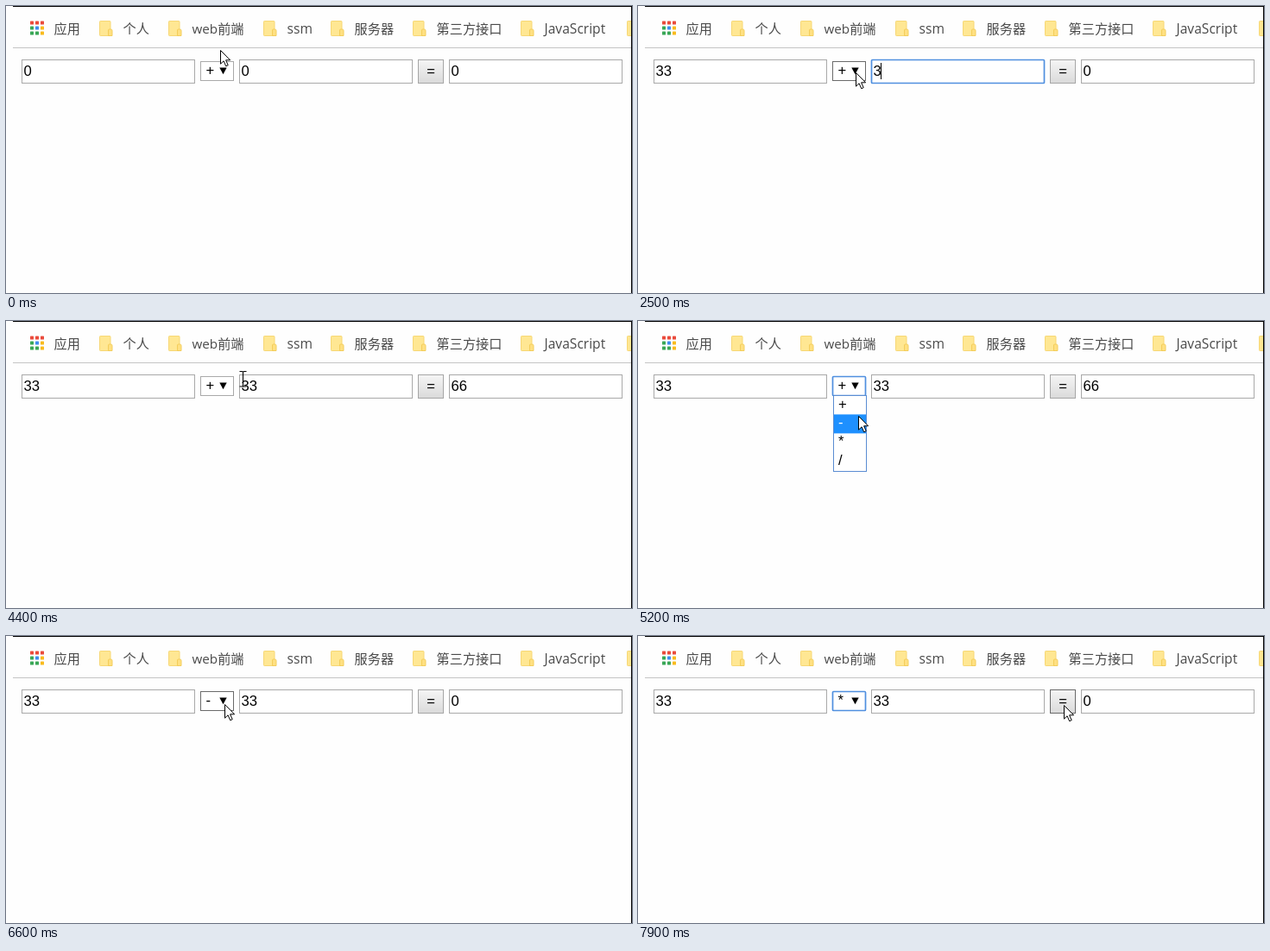
Animation of 725 by 333 pixels, one loop 8 s. Source, as an HTML page:

```html
<!DOCTYPE html>
<html lang="zh">
<head>
<meta charset="utf-8">
<title>Calculator</title>
<style>
html, body { margin: 0; width: 100%; height: 100%; overflow: hidden; background: #fefefe; }
svg { display: block; width: 725px; height: 333px; }
text { font: 16.67px "Liberation Sans", Arial, sans-serif; fill: #000; white-space: pre; }
.bar text { font: 15.2px "Open Sans", "Noto Sans CJK SC", "Noto Sans CJK", sans-serif; fill: #4a4a4a; }
.bar text.latin { font-size: 15.6px; }
</style>
</head>
<body>
<svg id="stage" viewBox="0 0 725 333" xmlns="http://www.w3.org/2000/svg">
  <defs>
    <linearGradient id="up" x1="0" y1="0" x2="0" y2="1">
      <stop offset="0" stop-color="#f5f5f5"/><stop offset="1" stop-color="#dadada"/>
    </linearGradient>
    <linearGradient id="down" x1="0" y1="0" x2="0" y2="1">
      <stop offset="0" stop-color="#dcdcdc"/><stop offset="1" stop-color="#eeeeee"/>
    </linearGradient>
  </defs>
  <rect width="725" height="333" fill="#fefefe"/>
</svg>
<script>
const NS = 'http://www.w3.org/2000/svg';
const LOOP = 8000, STEP = 100, DIGIT = 9.27;
const stage = document.getElementById('stage');

function add(parent, tag, attrs, text) {
  const el = document.createElementNS(NS, tag);
  set(el, attrs);
  if (text !== undefined) el.textContent = text;
  return parent.appendChild(el);
}
function set(el, attrs) {
  for (const k in attrs) el.setAttribute(k, attrs[k]);
}
function show(el, on) {
  el.setAttribute('visibility', on ? 'visible' : 'hidden');
}
const between = (t, a, b) => t >= a && t < b;

// Bookmark bar
const bar = add(stage, 'g', { class: 'bar' });
const [red, green, blue, yellow] = ['#ea4b3c', '#3aa757', '#3f8cf0', '#f9bb1e'];
[red, red, red, green, blue, yellow, green, green, yellow].forEach((fill, i) =>
  add(bar, 'rect', { x: 28 + i % 3 * 6, y: 17.5 + Math.floor(i / 3) * 6, width: 4, height: 4, rx: 0.6, fill }));
add(bar, 'text', { x: 55.5, y: 32 }, '应用');

function folder(x) {
  const g = add(bar, 'g', { transform: `translate(${x} 17)` });
  add(g, 'rect', { x: 0.5, y: 0.5, width: 12.5, height: 17, rx: 0.8, fill: '#ffe793', stroke: '#f7d774' });
  add(g, 'path', { d: 'M10.5 17.5V11q0-1 1-1h2q1.5 0 1.5 1.5v6z', fill: '#ffe082', stroke: '#f2cb55', 'stroke-width': 0.9 });
}
[[108, '个人'], [188, 'web前端'], [298, 'ssm'], [376, '服务器'], [471, '第三方接口'], [596, 'JavaScript']]
  .forEach(([x, label]) => {
    folder(x);
    add(bar, 'text', { x: x + 27.5, y: 32, class: /^\w+$/.test(label) ? 'latin' : '' }, label);
  });
folder(719);
add(stage, 'rect', { x: 8, y: 48, width: 716, height: 1, fill: '#c4c4c4' });
add(stage, 'rect', { x: 8, y: 0, width: 717, height: 1, fill: '#000' });
add(stage, 'rect', { x: 724, y: 0, width: 1, height: 333, fill: '#000' });

// Form controls
function field(x) {
  const box = add(stage, 'rect', { x: x + 0.5, y: 62.5, width: 200, height: 27, fill: '#fff' });
  const mark = add(stage, 'rect', { x: x + 2.5, y: 66, width: DIGIT, height: 19, fill: '#3390ff' });
  const text = add(stage, 'text', { x: x + 2.5, y: 81 });
  const caret = add(stage, 'rect', { y: 66, width: 1, height: 19 });
  return (value, focus, selected) => {
    border(box, focus, '#a9a9a9');
    show(mark, selected);
    text.textContent = value;
    text.style.fill = selected ? '#fff' : '#000';
    caret.setAttribute('x', Math.round(x + 2.5 + DIGIT * value.length - 0.5));
    show(caret, focus && !selected);
  };
}
function border(el, focus, plain) {
  set(el, focus ? { stroke: '#4f8fdf', 'stroke-width': 1.7, rx: 1 } : { stroke: plain, 'stroke-width': 1, rx: 0 });
}
const first = field(18), second = field(270), result = field(513);

const select = add(stage, 'rect', { x: 225.5, y: 64.5, width: 38, height: 22, fill: '#fff' });
const chosen = add(stage, 'text', { x: 231.5, y: 80 });
add(stage, 'path', { d: 'M247.3 71.5h8.4l-4.2 7.8z' });

const button = add(stage, 'rect', { x: 477.5, y: 62.5, width: 29, height: 27 });
add(stage, 'text', { x: 487.3, y: 81 }, '=');

const list = add(stage, 'g', {});
add(list, 'rect', { x: 226.5, y: 86.5, width: 38, height: 88, fill: '#fff', stroke: '#5a8cd2' });
const glow = add(list, 'rect', { x: 227, width: 37, height: 22, fill: '#1e90ff' });
const OPS = ['+', '-', '*', '/'];
const options = OPS.map((op, i) => add(list, 'text', { x: 232, y: 101.5 + i * 21.8 }, op));

// Pointer
const arrow = add(stage, 'path', {
  d: 'M.5.5V16.2L4.1 12.8 6.7 18.8 9.2 17.7 6.6 11.8H11.6Z',
  fill: '#fff', stroke: '#000', 'stroke-width': 1
});
const beam = add(stage, 'path', {
  d: 'M-4-8.5h3q1 0 1 1 0-1 1-1h3M0-7.5V8M-4 9h3q1 0 1-1 0 1 1 1h3',
  fill: 'none', stroke: '#000', 'stroke-width': 1.1
});

const PATH = [
  [0, 248, 51], [100, 257, 62], [200, 246, 82], [300, 224, 84], [400, 110, 80], [500, 34, 77],
  [600, 22, 76], [700, 12, 76], [1400, 12, 76], [1500, 28.5, 75], [1600, 30, 75], [2100, 279, 76],
  [2300, 258, 76], [2400, 252, 76.5], [2700, 252, 76.5], [3200, 480, 76], [3300, 506, 76],
  [3500, 490, 75], [3700, 490, 75], [4400, 274, 67], [4600, 250, 72], [4800, 250, 75],
  [5200, 255, 110], [5300, 255, 110], [5400, 270, 106], [5800, 496, 77], [5900, 499, 76],
  [6100, 499, 76], [6600, 253, 79], [6700, 250, 79], [7000, 244, 118], [7100, 240, 133],
  [7200, 240, 133], [7400, 268, 122], [7800, 484, 82], [7900, 493, 80], [8000, 493, 80]
];
function pointer(t) {
  const i = PATH.findIndex(p => p[0] > t);
  const [t0, x0, y0] = PATH[i - 1], [t1, x1, y1] = PATH[i];
  const k = (t - t0) / (t1 - t0);
  return [x0 + (x1 - x0) * k, y0 + (y1 - y0) * k];
}
const over = (x, y, left, top, w, h) => between(x, left, left + w) && between(y, top, top + h);

function draw(t) {
  const [x, y] = pointer(t);
  const dragging = between(t, 600, 1500) || between(t, 2200, 2400);
  const open = between(t, 4700, 5400) || between(t, 6700, 7300);
  const pressed = between(t, 3500, 3800) || between(t, 5900, 6000);
  const op = t < 5400 ? 0 : t < 7300 ? 1 : 2;

  first(t < 1500 ? '0' : t < 1600 ? '3' : '33', between(t, 500, 2100), between(t, 600, 1500));
  second(t < 2400 ? '0' : t < 2700 ? '3' : '33', between(t, 2100, 3600), between(t, 2200, 2400));
  result(between(t, 3800, 6000) ? '66' : '0', false, false);

  border(select, between(t, 4700, 5900) || t >= 6700, over(x, y, 225, 64, 39, 23) ? '#6a6a6a' : '#a9a9a9');
  chosen.textContent = OPS[op];
  set(button, {
    fill: pressed ? 'url(#down)' : 'url(#up)',
    stroke: over(x, y, 477, 62, 30, 28) ? '#6a6a6a' : '#a6a6a6'
  });

  const row = y < 87 ? op : Math.floor((y - 86) / 22);
  show(list, open);
  glow.setAttribute('y', 86.5 + row * 21.9);
  options.forEach((el, i) => { el.style.fill = i === row ? '#fff' : '#000'; });

  const typing = dragging || [18, 270, 513].some(left => over(x, y, left, 62, 201, 28));
  show(beam, typing);
  show(arrow, !typing);
  const at = { transform: `translate(${Math.round(x)} ${Math.round(y)})` };
  set(arrow, at);
  set(beam, { transform: `translate(${Math.floor(x) + 0.5} ${Math.round(y)})` });
}

const start = performance.now();
function tick() {
  const t = (performance.now() - start) % LOOP;
  draw(Math.floor(t / STEP) * STEP);
  requestAnimationFrame(tick);
}
tick();
</script>
</body>
</html>
```
